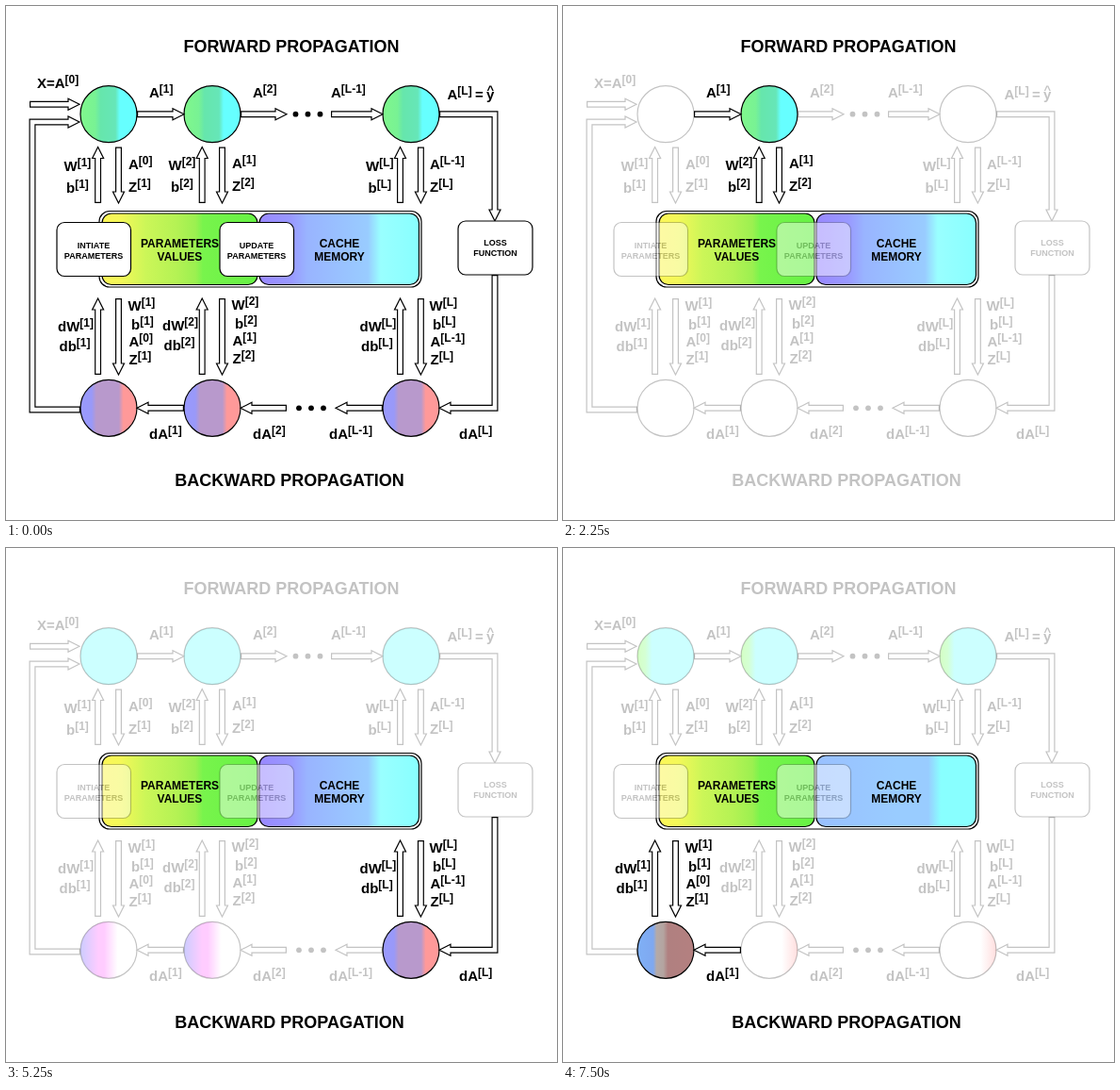
Animation of 585x545 px, one loop 8 s. Source, as an HTML page:

```html
<!DOCTYPE html>
<html lang="en">
<head>
<meta charset="utf-8">
<title>Forward and backward propagation</title>
<style>
html, body { margin: 0; width: 100%; height: 100%; overflow: hidden; background: #fff; }
svg { display: block; }
text { font: bold 15px "Liberation Sans", Arial, sans-serif; fill: #000; stroke: none; }
.title { font-size: 18px; text-anchor: middle; }
.bar { font-size: 12px; text-anchor: middle; }
.small { font-size: 9px; text-anchor: middle; }
.sup { font-size: 12px; }
.hat { font-size: 13px; }
g { stroke: #000; stroke-width: 1.2; fill: #fff; }
</style>
</head>
<body>
<svg id="stage" width="585" height="545" viewBox="0 0 585 545"></svg>
<script>
const STEP = 750, LOOP = 8000, DIM = 0.23;
const TOP = 114.7, LOW = 426.3;
const stage = document.getElementById('stage');

const gradient = (id, stops) => `<linearGradient id="${id}">` + stops.split(',').map(stop => {
  const [color, offset] = stop.trim().split(' ');
  return `<stop offset="${offset}" stop-color="${color}"/>`;
}).join('') + '</linearGradient>';

// A label such as "dA[L-1]": the bracketed part is raised.
const label = (x, y, s) => `<text x="${x}" y="${y}">` +
  s.replace(/\[.*?\]/, m => `<tspan class="sup" dy="-5">${m}</tspan>`) + '</text>';

const lines = (cls, x, y, gap, ...rows) => rows.map((row, i) =>
  `<text class="${cls}" x="${x}" y="${y + i * gap}">${row}</text>`).join('');

const rect = (x, y, w, h, r, extra = '') =>
  `<rect x="${x}" y="${y}" width="${w}" height="${h}" rx="${r}" ${extra}/>`;

// Hollow arrow along a list of [x, y] points, the last being the tip.
function arrow(...points) {
  const [tx, ty] = points.at(-1), [px, py] = points.at(-2);
  const length = Math.hypot(tx - px, ty - py);
  const ux = (tx - px) / length, uy = (ty - py) / length;
  const body = d => [...points.slice(0, -1), [tx - ux * d, ty - uy * d]].join(' ');
  const corner = side => [tx - ux * 12 - uy * 6 * side, ty - uy * 12 + ux * 6 * side];
  return `<polyline points="${body(11)}" fill="none" stroke-width="7"/>` +
    `<polygon points="${[[tx, ty], corner(1), corner(-1)].join(' ')}"/>` +
    `<polyline points="${body(9.5)}" fill="none" stroke="#fff" stroke-width="4.6" stroke-dasharray="0 1.2 2000"/>`;
}

const dots = (x, y) => [0, 13, 26].map(d =>
  `<circle cx="${x + d}" cy="${y}" r="2.9" fill="#000" stroke="none"/>`).join('');

const ring = (x, y) => `<circle cx="${x}" cy="${y}" r="30" fill="none"/>`;

// Everything in a part is lit during its steps and during step 0.
const part = (steps, ...content) =>
  `<g data-steps="${steps.join(' ')}">${content.join('')}</g>`;

// A small box over the bar; the veil whitens the bar below it while it is unlit.
const overlayBox = (steps, x, ...rows) =>
  rect(x, 229.5, 78.5, 57, 8, 'fill="#fff" opacity="0.28"') +
  part(steps, rect(x, 229.5, 78.5, 57, 8), lines('small', x + 39, 256.5, 11.5, ...rows));

const columns = [
  { cx: 109, up: 97.6, down: 119.5, n: '1', prev: '0', left: 55, right: 130, dy: 0, forward: 2, backward: 10 },
  { cx: 219, up: 208.2, down: 229.5, n: '2', prev: '1', left: 166, right: 240, dy: -1.5, forward: 3, backward: 9 },
  { cx: 430, up: 418.5, down: 440.4, n: 'L', prev: 'L-1', left: 375.5, right: 450, dy: -0.5, forward: 5, backward: 7 }
];

const inputs = [
  arrow([25, 104.2], [78, 104.2]) + label(33, 87, 'X=A[0]'),
  arrow([139, TOP], [189, TOP]) + label(152, 97, 'A[1]'),
  arrow([345, TOP], [400, TOP]) + label(345, 97, 'A[L-1]')
];
const returns = [
  arrow([189, LOW], [139, LOW]) + label(152, 459, 'dA[1]'),
  arrow([298, LOW], [249, LOW]) + label(262, 458.5, 'dA[2]'),
  arrow([519, 285], [519, LOW], [460, LOW]) + label(481, 458.5, 'dA[L]')
];

const forwardPart = (c, i) => part([c.forward], ring(c.cx, TOP), inputs[i],
  arrow([c.up, 209], [c.up, 149.5]), arrow([c.down, 149.5], [c.down, 209]),
  label(c.left + 6.5, 175 + c.dy, `W[${c.n}]`), label(c.left + 9, 198 + c.dy, `b[${c.n}]`),
  label(c.right, 173 + c.dy, `A[${c.prev}]`), label(c.right, 197 + c.dy, `Z[${c.n}]`));

const backwardPart = (c, i) => part([c.backward], ring(c.cx, LOW), returns[i],
  arrow([c.up, 391], [c.up, 310]), arrow([c.down, 310], [c.down, 391]),
  label(c.left, 345 + c.dy, `dW[${c.n}]`), label(c.left + 1.5, 366 + c.dy, `db[${c.n}]`),
  label(c.right - 0.5, 323 + c.dy, `W[${c.n}]`), label(c.right + 3, 343 + c.dy, `b[${c.n}]`),
  label(c.right + 0.5, 361 + c.dy, `A[${c.prev}]`), label(c.right + 0.5, 380 + c.dy, `Z[${c.n}]`));

const discs = columns.map(c =>
  `<circle cx="${c.cx}" cy="${TOP}" r="30" data-row="top" data-lit="${c.forward}"/>` +
  `<circle cx="${c.cx}" cy="${LOW}" r="30" data-row="low" data-lit="${c.backward}"/>`).join('');

const stored = [2, 3, 4, 5, 6, 7, 8, 9, 10];

stage.innerHTML = '<defs>' +
  gradient('topLit', '#80f78c 0, #78f294 .26, #66e6ac .36, #66e6b8 .62, #66ffff .7, #66ffff 1') +
  gradient('topCyan', '#ccffff 0, #ccffff 1') +
  gradient('topMint', '#d4ffc4 0, #d4ffd4 .14, #ccffff .26, #ccffff 1') +
  gradient('lowLit', '#9999ff 0, #9999f8 .2, #b899cc .28, #b899cc .68, #ff9999 .76, #ff9999 1') +
  gradient('lowWarm', '#7fb0f6 0, #7fa8f0 .28, #b4aaa8 .34, #b4a4a0 .46, #b08080 .54, #b48080 1') +
  gradient('lowPink', '#d4ccff 0, #ffccff .22, #ffccff .72, #ffcccc .9, #ffcccc 1') +
  gradient('lowHalf', '#ccccff 0, #ffccff .32, #ffccff .42, #ffffff .66, #ffffff 1') +
  gradient('lowWide', '#ffccff 0, #ffccff .48, #ffffff .8, #ffffff 1') +
  gradient('lowFaint', '#ffffff 0, #ffffff .72, #ffdede 1') +
  gradient('params', '#fcf658 0, #f4f858 .12, #ccf658 .28, #b4f254 .48, #9cf050 .6, #78f44c .65, #66f244 1') +
  gradient('cacheFull', '#9988ff 0, #9999ff .2, #99b4ff .3, #99ccff .68, #99ffff .76, #88ffff 1') +
  gradient('cacheBlue', '#99c0ff 0, #99ccff .5, #99ccff .7, #88ffff .78, #88ffff 1') +
  gradient('cacheDim', '#dcccff 0, #d4dcff .05, #ccffff .16, #ccffff 1') +
  '</defs>' + discs +
  part([2, 3, 4, 5], lines('title', 303, 49, 0, 'FORWARD PROPAGATION')) +
  part([7, 8, 9, 10], lines('title', 301, 508.5, 0, 'BACKWARD PROPAGATION')) +
  part([], arrow([79, 428], [28, 428], [28, 123], [78, 123])) +
  columns.map(forwardPart).join('') + columns.map(backwardPart).join('') +
  part([4], arrow([249, TOP], [298, TOP]), label(262, 97, 'A[2]'), dots(307.5, TOP)) +
  part([8], arrow([400, LOW], [350, LOW]), label(343, 459, 'dA[L-1]'), dots(311, LOW)) +
  part([6], arrow([460, TOP], [519, TOP], [519, 228]), label(468.5, 98.5, 'A[L]'),
    '<text x="498" y="98.5">=</text><text x="510" y="98.5">y</text><text class="hat" x="510.4" y="93">^</text>',
    rect(480, 228, 79, 57, 8), lines('small', 519.5, 253.5, 11, 'LOSS', 'FUNCTION')) +
  part(stored, rect(99, 217.5, 342, 80.5, 11)) +
  rect(269, 220, 169.5, 75.5, 10, 'id="cache"') +
  part(stored, rect(269, 220, 169.5, 75.5, 10, 'fill="none"'),
    lines('bar', 354, 255.5, 14, 'CACHE', 'MEMORY')) +
  part([1, ...stored], rect(102, 220, 165, 75.5, 10, 'fill="url(#params)"'),
    lines('bar', 184.5, 255.5, 14, 'PARAMETERS', 'VALUES')) +
  overlayBox([1], 54, 'INTIATE', 'PARAMETERS') +
  overlayBox([], 227, 'UPDATE', 'PARAMETERS');

// Tint of the unlit discs in each step; an empty name means white.
const dimFills = {
  top: ['', 'topMint', '', '', '', '', 'topCyan', 'topCyan', 'topCyan', 'topMint', 'topMint'],
  low: ['', 'lowPink', '', '', '', '', 'lowHalf', 'lowHalf', 'lowWide', 'lowFaint', 'lowFaint']
};
const parts = [...stage.querySelectorAll('g')].map(node => ({
  node, steps: node.dataset.steps.split(' ').filter(Boolean).map(Number)
}));
const discNodes = [...stage.querySelectorAll('[data-row]')];
const cache = document.getElementById('cache');
let shown = -1;

function show(step) {
  for (const { node, steps } of parts) {
    node.setAttribute('opacity', step === 0 || steps.includes(step) ? 1 : DIM);
  }
  for (const disc of discNodes) {
    const { row, lit } = disc.dataset;
    const litFill = row === 'top' ? 'topLit' : step > 8 ? 'lowWarm' : 'lowLit';
    const fill = step === 0 || +lit === step ? litFill : dimFills[row][step];
    disc.setAttribute('fill', fill ? `url(#${fill})` : '#fff');
  }
  const cacheFill = step === 1 ? 'cacheDim' : step > 7 ? 'cacheBlue' : 'cacheFull';
  cache.setAttribute('fill', `url(#${cacheFill})`);
}

function frame() {
  const step = Math.floor(performance.now() % LOOP / STEP);
  if (step !== shown) show(shown = step);
  requestAnimationFrame(frame);
}
frame();
</script>
</body>
</html>
```
